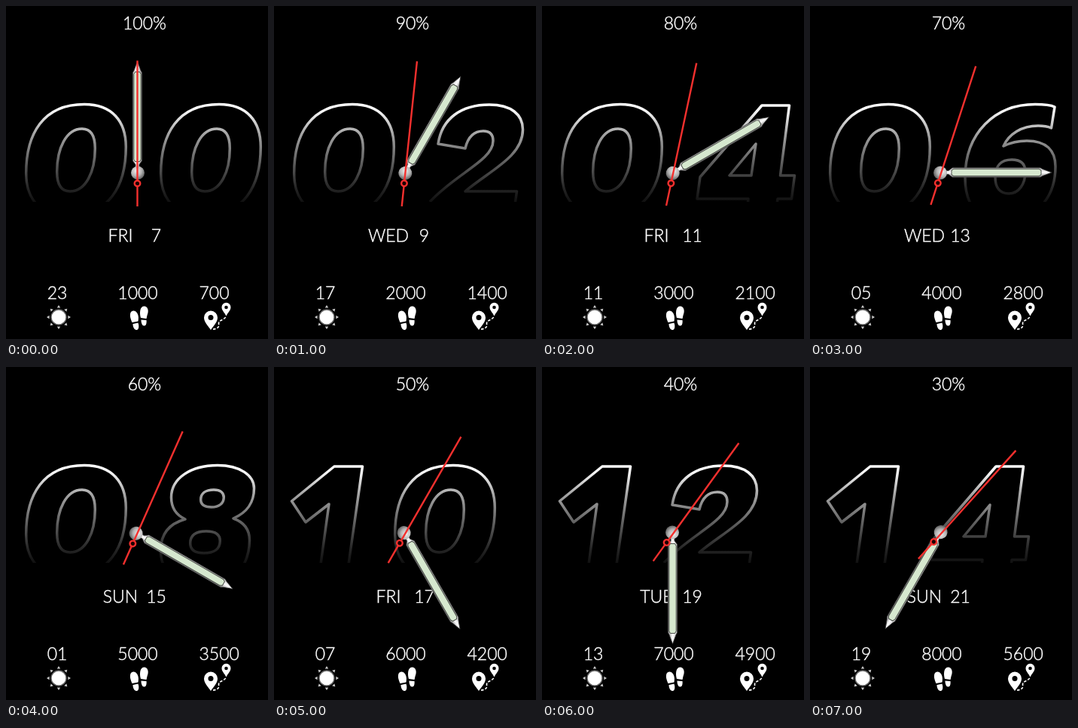
These frames come from a looping animation (348x442 px, 8 s). An HTML page:

```html
<!DOCTYPE html>
<html lang="en">
<head>
<meta charset="utf-8">
<title>Watch face</title>
<style>
  html, body { margin: 0; width: 100%; height: 100%; overflow: hidden; background: #000; }
  svg { display: block; width: 348px; height: 442px; }
  text { font: 300 23px "Century Gothic", Lato, sans-serif; fill: #fff; stroke: #fff; stroke-width: .45px; }
  .mid { text-anchor: middle; }
  .big { fill: none; stroke: url(#fade); stroke-width: 3.5; stroke-linejoin: round; }
</style>
</head>
<body>
<svg viewBox="0 0 348 442">
  <defs>
    <linearGradient id="fade" gradientUnits="userSpaceOnUse" x1="0" y1="130" x2="0" y2="262">
      <stop offset="0" stop-color="#fff"/>
      <stop offset=".08" stop-color="#f4f4f4"/>
      <stop offset=".3" stop-color="#a4a4a4"/>
      <stop offset=".6" stop-color="#5c5c5c"/>
      <stop offset=".85" stop-color="#242424"/>
      <stop offset="1" stop-color="#0e0e0e"/>
    </linearGradient>
    <linearGradient id="rim">
      <stop offset="0" stop-color="#bbb"/>
      <stop offset=".5" stop-color="#fff"/>
      <stop offset="1" stop-color="#888"/>
    </linearGradient>
    <radialGradient id="knob" cx=".4" cy=".35" r=".7">
      <stop offset="0" stop-color="#eee"/>
      <stop offset=".55" stop-color="#b4b4b4"/>
      <stop offset="1" stop-color="#555"/>
    </radialGradient>
    <clipPath id="cut"><path d="M0 120H348V260H0Z"/></clipPath>
    <path id="ray" d="M-2.2 -12.4H2.2L0 -16Z" fill="#ccc"/>
  </defs>

  <g clip-path="url(#cut)">
    <path id="tens" class="big"/>
    <path id="ones" class="big"/>
  </g>

  <text id="battery" class="mid" x="184" y="30.5"></text>
  <text id="day" class="mid" x="152" y="313"></text>
  <text id="date" class="mid" x="199.5" y="313"></text>
  <text id="temp" class="mid" x="68" y="389"></text>
  <text id="steps" class="mid" x="175" y="389"></text>
  <text id="dist" x="256.5" y="389"></text>

  <g id="sun" transform="translate(70 413)" fill="#fff">
    <circle r="10" stroke="#666" stroke-width="1.4"/>
  </g>

  <g fill="#fff">
    <path d="M179 414C177 407 178 399 183 398.500C188 398 190 404 188 409C187 412 187 414 186.500 415Z"/>
    <path d="M179.500 416.500L186.500 417C187 421 186 424.500 183.500 424.500C181 424.500 179.500 421 179.500 416.500Z"/>
    <path d="M167.500 420C165.500 415 164 411 165.500 407C167 403.500 172 403.500 174.500 408C176.500 412 176 415 175.500 418.500Z"/>
    <path d="M168.500 422L175.500 420.500C177 425 176.500 429.500 173.500 430C170.500 430.300 168.500 426 168.500 422Z"/>
  </g>

  <g fill="#fff" fill-rule="evenodd">
    <path d="M272 430C268 424 263 419.500 263 413.500A9 9 0 0 1 281 413.500C281 419.500 276 424 272 430ZM268.500 413.500a3.500 3.500 0 1 0 7 0a3.500 3.500 0 1 0 -7 0Z"/>
    <path d="M292.500 411.500C290 406.500 286.500 404 286.500 399.800A6 6 0 0 1 298.500 399.800C298.500 404 295 406.500 292.500 411.500ZM290.200 400a2.300 2.300 0 1 0 4.600 0a2.300 2.300 0 1 0 -4.600 0Z"/>
    <path d="M275 429C281 428.500 283.500 426 282.500 422C282 416.500 289 417.500 292 412.500" fill="none" stroke="#fff" stroke-width="1.6" stroke-dasharray="3.500 2"/>
  </g>

  <g transform="translate(174 220.500)">
    <g id="hour">
      <path d="M.5 -147L5 -135L6.700 -132V-15L3 -10V-7H-2V-10L-5.700 -15V-132L-4 -135Z" fill="url(#rim)" stroke="#333" stroke-width=".8"/>
      <path d="M-4.200 -130L-2.500 -133H3.500L5.200 -130V-17L3.500 -14H-2.500L-4.200 -17Z" fill="#d6e8cf" stroke="#3c3f3a" stroke-width=".9"/>
      <circle cx="1" cy="1" r="9" fill="url(#knob)"/>
    </g>
    <g id="second" stroke="#f4302e" stroke-width="2.400" fill="none">
      <path d="M.5 -148V11M.5 19V45.500"/>
      <circle cx=".5" cy="15" r="3.800" fill="#1c0000"/>
    </g>
  </g>
</svg>
<script>
  const $ = id => document.getElementById(id);

  // Outlines; 0 and 1 sit in the left slot, the rest in the right one.
  const SLOT = 179, NARROW = 45;
  const glyphs = {
    0: "M104 130.500C141 130.500 159.300 153 159.300 187C159.300 239 137 278.500 82 278.500C45 278.500 26.700 256 26.700 222C26.700 170 49 130.500 104 130.500Z" +
       "M101 163C113 163 118.300 173 118.300 189C118.300 220 106 246 85 246C73 246 67.700 236 67.700 220C67.700 189 80 163 101 163Z",
    1: "M62 262L73 182L42 206L23.500 178L80 132H117.500L99 262",
    2: "M207 260C242 222 291 205 291 179C291 171 287 166 278 166C267 166 258 172 254 189L218 183" +
       "C223 149 249 131 286 131C315 131 330.500 144 330.500 164C330.500 200 287 218 254 246H322.500L320 264",
    4: "M273 264L274 256H206L210 227L292 132H328.500L316.500 225H335.500L331.500 256H313L312 264M284 183L249 225H278Z",
    6: "M213 262C208 252 206 241 206 228C206 168 246 130.500 299 130.500C309 130.500 319 131 325 134L320.500 162" +
       "C316 160 308 159 303 159C281 159 264 170 257 186C267 181 277 179 288 179C314 179 326 192 326 213C326 232 320 250 310 262" +
       "M268 204C280 204 286 209 286 220C286 237 277 249 264 249C252 249 246 241 246 227C246 212 254 204 268 204Z",
    8: "M209 262C206 256 205.500 250 205.500 243C205.500 222 217 208 238 202C225 196 219.500 186 219.500 173C219.500 148 245 130.500 281 130.500" +
       "C311 130.500 329.500 144 329.500 161C329.500 181 320 193 302 201C316 206 323.500 215 323.500 230C323.500 242 321 252 316 262" +
       "M276 163C285 163 289.300 167 289.300 173C289.300 181 283 186 273 186C263 186 258.700 182 258.700 176C258.700 168 265 163 276 163Z" +
       "M266 218C279 218 284.300 223 284.300 231C284.300 242 276 247 263 247C250 247 244.700 242 244.700 234C244.700 223 252 218 266 218Z"
  };
  const days = ["SUN", "MON", "TUE", "WED", "THU", "FRI", "SAT"];
  const pad = n => String(n).padStart(2, "0");

  for (let a = 0; a < 360; a += 45) {
    const ray = document.createElementNS("http://www.w3.org/2000/svg", "use");
    ray.setAttribute("href", "#ray");
    ray.setAttribute("transform", `rotate(${a})`);
    $("sun").append(ray);
  }

  function show(k) {
    const [tens, ones] = pad(2 * k);
    const shift = (ones === "0" ? SLOT : 0) - (tens === "1" ? NARROW : 0);
    $("tens").setAttribute("d", glyphs[tens]);
    $("ones").setAttribute("d", glyphs[ones]);
    $("ones").setAttribute("transform", `translate(${shift})`);
    $("hour").setAttribute("transform", `rotate(${30 * k})`);
    $("second").setAttribute("transform", `rotate(${6 * k})`);

    const date = new Date(2022, k, 7 + 2 * k);
    $("battery").textContent = 100 - 10 * k + "%";
    $("day").textContent = days[date.getDay()];
    $("date").textContent = date.getDate();
    $("temp").textContent = pad(Math.abs(23 - 6 * k));
    $("steps").textContent = 1000 * (k + 1);
    $("dist").textContent = 700 * (k + 1);
  }

  let start, last;
  function tick(now) {
    start ??= now;
    const k = Math.floor((now - start) / 1000) % 8;
    if (k !== last) show(last = k);
    requestAnimationFrame(tick);
  }
  show(0);
  requestAnimationFrame(tick);
</script>
</body>
</html>
```
